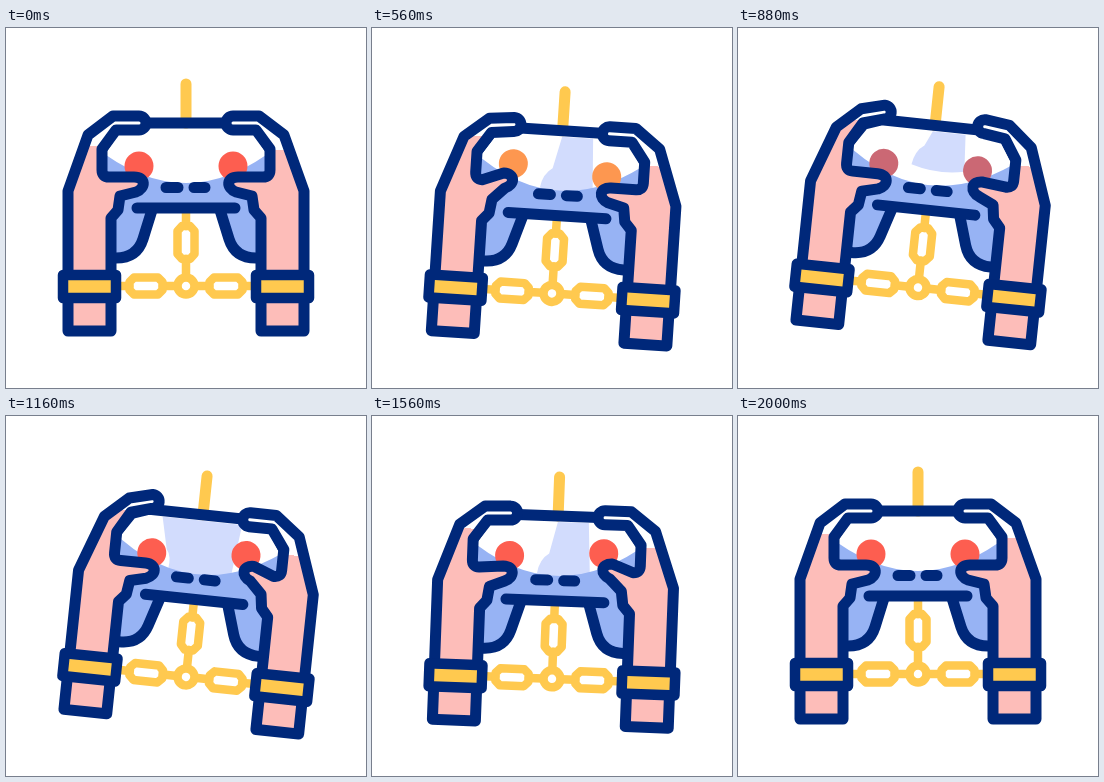
An HTML page that plays this animation: 360x360 px, repeating every 2.04 s.

```html
<!DOCTYPE html>
<html lang="en">
<head>
<meta charset="utf-8">
<title>Chained to the controller</title>
<style>
html, body { margin: 0; width: 100%; height: 100%; overflow: hidden; background: #fff; }
svg { display: block; width: 100vw; height: 100vh; }
.ink { fill: none; stroke: #00287a; stroke-width: 11; stroke-linecap: round; stroke-linejoin: round; }
.gold { fill: none; stroke: #ffc94f; stroke-width: 8.5; stroke-linecap: round; stroke-linejoin: round; }
.blue { fill: #97b3f4; }
</style>
</head>
<body>
<svg viewBox="0 0 360 360">
  <defs>
    <linearGradient id="skinL" gradientUnits="userSpaceOnUse" x1="0" y1="0" x2="0" y2="360">
      <stop stop-color="#fff"/><stop stop-color="#fdbdb9"/>
    </linearGradient>
    <linearGradient id="skinR" gradientUnits="userSpaceOnUse" x1="0" y1="0" x2="0" y2="360">
      <stop stop-color="#fff"/><stop stop-color="#fdbdb9"/>
    </linearGradient>
    <g id="grip">
      <path class="blue" d="M106 160L146 178L137 212Q131 230 106 230Z"/>
      <path class="ink" d="M146 182L137 211Q131 230 110 230"/>
    </g>
    <g id="sideChain" class="gold">
      <path d="M114 258H123M157 258H171"/>
      <path d="M128 249.500H152L156.500 254V262L152 266.500H128L123.500 262V254Z"/>
    </g>
    <g id="cuff">
      <rect class="ink" x="62" y="262" width="43" height="41" style="fill:#fdbdb9"/>
      <rect class="ink" x="57" y="247" width="53" height="23" style="fill:#ffc94f;stroke-width:10.5"/>
    </g>
  </defs>
  <g id="rig">
    <path class="gold" d="M180 56V95" style="stroke-width:11"/>
    <g class="gold">
      <path d="M180 184V198M180 231V249"/>
      <path d="M176 198H184L188.500 203V226L184 231H176L171.500 226V203Z"/>
      <circle cx="180" cy="258" r="8.500"/>
    </g>
    <use href="#sideChain"/>
    <use href="#sideChain" transform="translate(360) scale(-1 1)"/>
    <path id="shine" fill="#d2dcfd"/>
    <path class="blue" d="M88 118Q180 192 272 118V150L240 180H120L88 150Z"/>
    <g id="buttons">
      <circle id="buttonL" cx="133" r="14.500"/>
      <circle id="buttonR" cx="227" r="14.500"/>
    </g>
    <use href="#grip"/>
    <use href="#grip" transform="translate(360) scale(-1 1)"/>
    <path class="ink" d="M96 121L109 101L126 95H234L251 101L264 121M131 180H229M160 159.500H172M188 159.500H199"/>
    <path id="handL" class="ink" style="fill:url(#skinL)"/>
    <use href="#cuff"/>
    <g transform="translate(360) scale(-1 1)">
      <path id="handR" class="ink" style="fill:url(#skinR)"/>
      <use href="#cuff"/>
    </g>
  </g>
</svg>
<script>
const LOOP = 2040, STEP = 40;
const el = id => document.getElementById(id);
const ramp = (t, from, to) => {
  const p = Math.min(1, Math.max(0, (t - from) / (to - from)));
  return (1 - Math.cos(Math.PI * p)) / 2;
};
const pulse = (t, peak, reach) => 1 - ramp(Math.abs(t - peak), 0, reach);

function hand(finger, thumb) {
  const tipX = 133 - 5 * finger, tipY = 88 - 8 * finger;
  const bendX = 107 - 2 * finger, bendY = 88 - 2 * finger;
  const thumbX = 140 - 4 * thumb, thumbY = 149 - 8 * thumb;
  return `M62 250V163L82 107L${bendX} ${bendY}L${tipX} ${tipY}
    A7 7 0 0 1 ${tipX} ${tipY + 14}L${bendX + 3} ${bendY + 14}L96 121V142Q96 149 103 149
    L${thumbX - 12} ${thumbY}C${thumbX} ${thumbY} ${thumbX} ${thumbY + 11} ${thumbX - 10} ${thumbY + 15}
    L114 168L112 182L105 190V250`;
}

function drawSide(side, finger, thumb, skinTop) {
  el("hand" + side).setAttribute("d", hand(finger, thumb));
  el("button" + side).setAttribute("cy", 138 - 7 * thumb);
  for (const stop of el("skin" + side).children) stop.setAttribute("offset", skinTop / 360);
}

function drawShine(t) {
  const wide = pulse(t, 1160, 320);
  const low = 155 - 17 * pulse(t, 880, 240);
  const top = 180 - 40 * wide, foot = 161 - 10 * wide;
  el("shine").setAttribute("d", `M${top} 101H${211 + 9 * wide}L214 ${low}
    Q188 ${low + 6} ${foot} ${low - 2}Q${foot + 2} ${low - 16} ${(top + foot) / 2 + 2} ${low - 22}Z`);
  el("shine").setAttribute("visibility", t >= 480 && t < 1760 ? "visible" : "hidden");
}

function draw(t) {
  // The lean and the dip mirror around one second
  const s = t < 1000 ? t : 2000 - t;
  const lean = ramp(s, 150, 860);
  const dip = 8 * (s < 640 ? ramp(s, 180, 640) : 1 - ramp(s, 640, 980));
  el("rig").setAttribute("transform", `translate(0 ${dip}) rotate(${6 * lean} 180 258)`);

  // The right thumb taps steadily, the left one once on each swing
  const rightTap = pulse((t + 240) % 400, 200, 200) * ramp(s, 0, 300);
  drawSide("L", lean * lean, pulse(s, 560, 180), 118 - 20 * lean);
  drawSide("R", pulse(t, 360, 200) + pulse(t, 880, 200) / 2, rightTap, 122 + 4 * lean);
  drawShine(t);

  const glow = pulse(t, 560, 200), dusk = pulse(t, 880, 200);
  const rgb = [253 - 50 * dusk, 94 + 57 * glow + 10 * dusk, 80 + 36 * dusk];
  el("buttons").setAttribute("fill", `rgb(${rgb.map(Math.round)})`);
}

const start = performance.now();
function tick() {
  const t = (performance.now() - start) % LOOP;
  draw(Math.floor(t / STEP) * STEP);
  requestAnimationFrame(tick);
}
tick();
</script>
</body>
</html>
```
